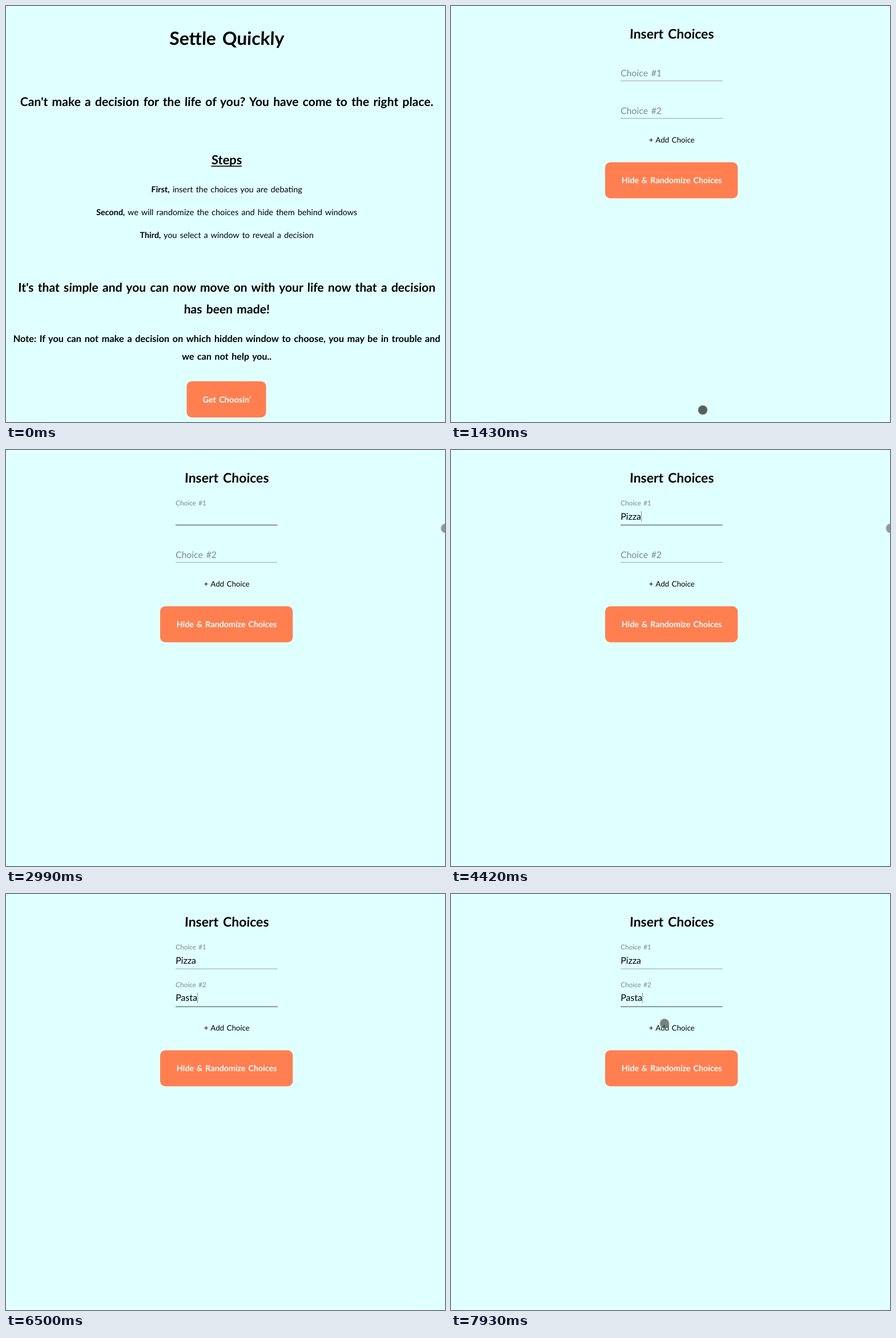
Write an HTML page that moves like this. It is 769 by 728 pixels and loops after 8 s.

```html
<!DOCTYPE html>
<html lang="en">
<head>
<meta charset="utf-8">
<title>Choice picker</title>
<style>
  html, body { margin: 0; width: 100%; height: 100%; overflow: hidden; background: #e0ffff; }
  svg { display: block; width: 769px; height: 728px; }
  text { font-family: Lato, "Open Sans", sans-serif; word-spacing: .1em; white-space: pre; }
  .bold { font-weight: 700; }
  .mid { text-anchor: middle; }
</style>
</head>
<body>
<svg id="stage" viewBox="0 0 769 728">
  <defs><clipPath id="edge"><rect x="316.5" y="656.7" width="139" height="63.3" rx="9"/></clipPath></defs>
  <g id="intro"></g>
  <g id="form"></g>
  <circle id="dot" r="8" fill="#343834" stroke="#7c7f78" stroke-width="1.2"/>
</svg>
<script>
const LOOP = 8000, STEP = 130;
const CLICK = 1040, SWITCH = 1430;
const INK = '#000', CORAL = '#ff7f50', PALE = '#ecffff', GREY = 'rgba(0,0,0,.46)';
const byId = id => document.getElementById(id);
const intro = byId('intro'), form = byId('form'), dot = byId('dot');

function add(parent, tag, attrs) {
  const el = document.createElementNS('http://www.w3.org/2000/svg', tag);
  for (const key in attrs) el.setAttribute(key, attrs[key]);
  return parent.appendChild(el);
}

// The lettering leans slightly to the right about its baseline.
const lean = (x, y) => `translate(${x} ${y}) skewX(-2)`;

function write(parent, str, x, y, size, cls = '', fill = INK) {
  const el = add(parent, 'text', { transform: lean(x, y), 'font-size': size, class: cls, fill });
  el.textContent = str;
  return el;
}

const heading = (parent, str, y, size, fill) => write(parent, str, 386.5, y, size, 'bold mid', fill);

function button(parent, x, y, w, h) {
  return add(parent, 'rect', { x, y, width: w, height: h, rx: 9, fill: CORAL });
}

// First page
heading(intro, 'Settle Quickly', 68, 31.8);
heading(intro, "Can't make a decision for the life of you? You have come to the right place.", 175, 21.1);
heading(intro, 'Steps', 277, 21.9);
add(intro, 'rect', { x: 359.5, y: 279.5, width: 53.5, height: 1.7, fill: INK });
[
  ['First,', ' insert the choices you are debating', 326],
  ['Second,', ' we will randomize the choices and hide them behind windows', 366],
  ['Third,', ' you select a window to reveal a decision', 406]
].forEach(([lead, rest, y]) => {
  const line = write(intro, '', 386.5, y, 14.4, 'mid');
  add(line, 'tspan', { class: 'bold' }).textContent = lead;
  add(line, 'tspan', {}).textContent = rest;
});
heading(intro, "It's that simple and you can now move on with your life now that a decision", 500, 21.1);
heading(intro, 'has been made!', 538, 21.1);
heading(intro, 'Note: If you can not make a decision on which hidden window to choose, you may be in trouble and', 588, 16.35);
heading(intro, 'we can not help you..', 619, 16.1);
button(intro, 316.5, 656.7, 139, 63.3);
const ripple = add(intro, 'circle', { cx: 441, cy: 707, r: 0, fill: '#fff', opacity: .11, 'clip-path': 'url(#edge)' });
heading(intro, "Get Choosin'", 693.5, 14.6, PALE);

// Second page
heading(form, 'Insert Choices', 57, 23);
function makeField(name, lineY, word, focus, blur, keys) {
  const label = write(form, name, 297, lineY - 8, 15.8, '', GREY);
  const value = write(form, '', 297, lineY - 9.5, 16);
  add(form, 'rect', { x: 297, y: lineY - .5, width: 178.5, height: 1, fill: 'rgba(0,0,0,.36)' });
  const bar = add(form, 'rect', { x: 297, y: lineY - .5, height: 2, fill: '#8f9e9f' });
  const caret = add(form, 'rect', { y: lineY - 24, width: 1, height: 18, fill: '#7d8f90' });
  return { label, value, bar, caret, lineY, word, focus, blur, keys };
}
const fields = [
  makeField('Choice #1', 131, 'Pizza', 2340, 5200, [3120, 3510, 3770, 4030, 4160]),
  makeField('Choice #2', 196.7, 'Pasta', 5200, LOOP, [5850, 6110, 6240, 6370, 6500])
];
write(form, '+ Add Choice', 386.5, 239, 13.2, 'mid');
button(form, 270, 273.5, 232.3, 63);
heading(form, 'Hide & Randomize Choices', 310, 14.3, PALE);

const clamp = v => Math.min(1, Math.max(0, v));
const smooth = v => { v = clamp(v); return v * v * (3 - 2 * v); };
const mix = (a, b, p) => a + (b - a) * p;

// Pointer stops: time, x, y, opacity
const stops = [
  [260, 470, 742, .62], [910, 441, 707, .62], [1040, 441, 707, .8], [1430, 441, 707, .8],
  [1560, 441, 707, .6], [2080, 335, 120, .5], [2470, 335, 120, .5], [2990, 770, 137, .5],
  [4680, 770, 137, .5], [7280, 258, 405, .5], [7930, 374, 226.5, .62]
];

function drawPointer(t) {
  const shown = t >= 260 && t < 4680 || t >= 7280;
  dot.setAttribute('visibility', shown ? 'visible' : 'hidden');
  if (!shown) return;
  const i = Math.max(1, stops.findIndex(s => s[0] >= t));
  const a = stops[i - 1], b = stops[i];
  const p = smooth((t - a[0]) / (b[0] - a[0]));
  dot.setAttribute('cx', mix(a[1], b[1], p));
  dot.setAttribute('cy', mix(a[2], b[2], p));
  dot.setAttribute('opacity', mix(a[3], b[3], p));
}

function drawField(f, t) {
  const on = t >= f.focus && t < f.blur;
  const rise = smooth((t - f.focus) / 200);
  f.label.setAttribute('transform', lean(297, f.lineY - mix(8, 34, rise)));
  f.label.setAttribute('font-size', mix(15.8, 11.8, rise));

  const wide = 178.5 * rise * (1 - smooth((t - f.blur) / 200));
  f.bar.setAttribute('x', 386.25 - wide / 2);
  f.bar.setAttribute('width', wide);

  const typed = f.keys.filter(k => k <= t);
  f.value.textContent = f.word.slice(0, typed.length);
  const since = t - (typed.length ? typed[typed.length - 1] : f.focus);
  const blink = since % 1040 < 520;
  f.caret.setAttribute('visibility', on && blink ? 'inherit' : 'hidden');
  f.caret.setAttribute('x', 296.7 + (typed.length ? f.value.getComputedTextLength() + .5 : 0));
}

function draw(now) {
  const t = Math.floor(now % LOOP / STEP) * STEP;
  const first = t < SWITCH;
  intro.setAttribute('visibility', first ? 'visible' : 'hidden');
  form.setAttribute('visibility', first ? 'hidden' : 'visible');
  ripple.setAttribute('r', t > CLICK ? 107 + (t - CLICK - STEP) * .3 : 0);
  fields.forEach(f => drawField(f, t));
  drawPointer(t);
}

const start = performance.now();
function tick() {
  draw(performance.now() - start);
  requestAnimationFrame(tick);
}
tick();
</script>
</body>
</html>
```
